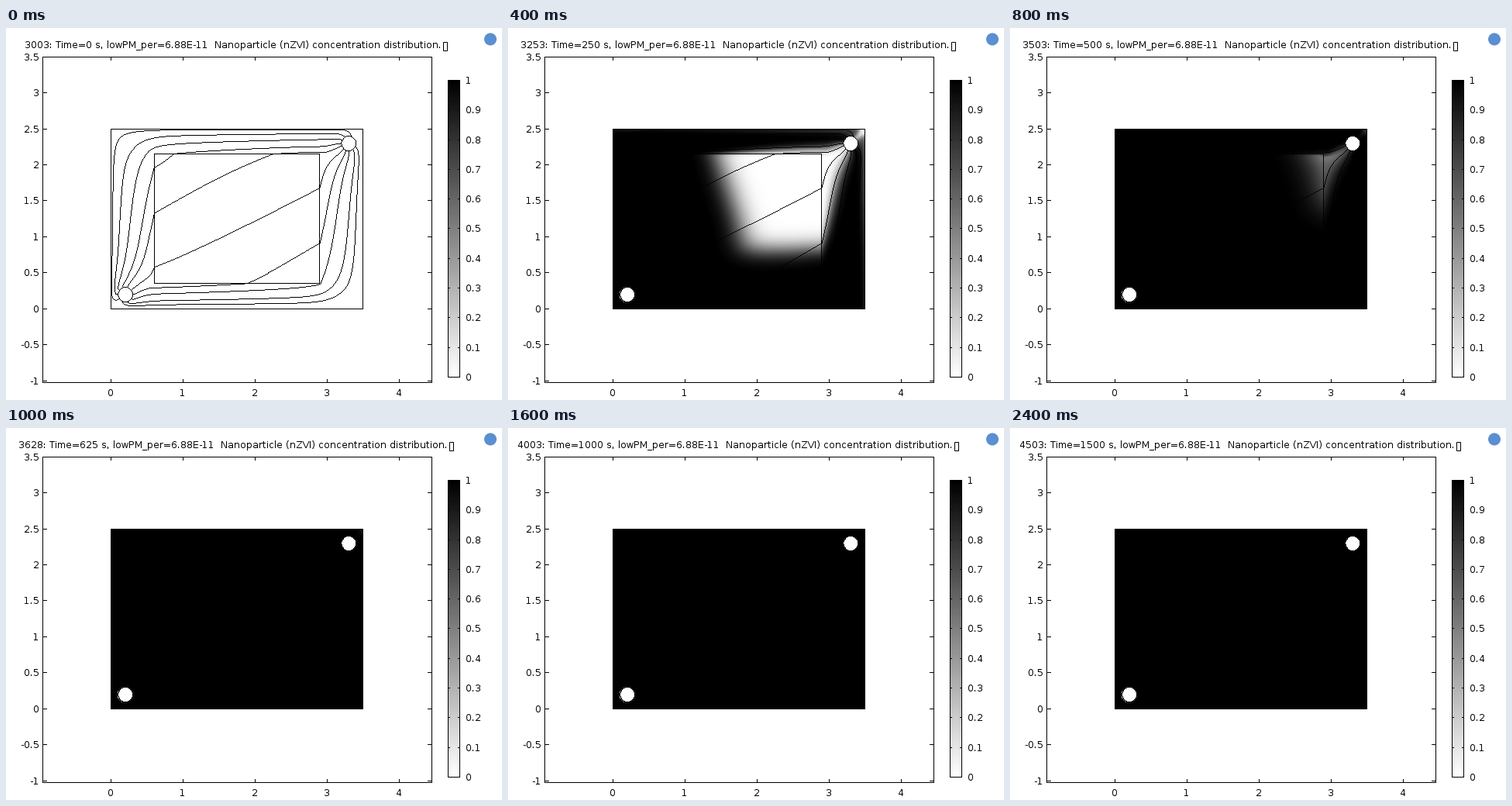
Animation, 640 px wide and 480 px high, one loop 2500 ms. Source, as a matplotlib script:

```python
import numpy as np
import matplotlib.pyplot as plt
from matplotlib.animation import FuncAnimation
from matplotlib.patches import Circle, Rectangle

W, H, DPI = 640, 480, 100
FRAMES, STEP = 25, 62.5
PX = 72 / DPI

# Flow model: box with a tight inner block, inlet bottom left, outlet top right
CELL, NX, NY = 0.025, 140, 100
BLOCK = (0.6, 0.35, 2.9, 2.15)
INLET, OUTLET, R = (0.2, 0.2), (3.3, 2.3), 0.1
BLOCK_PERM, RATE, DIFFUSION = 0.135, 0.032, 1.2e-5

X, Y = np.meshgrid((np.arange(NX) + 0.5) * CELL, (np.arange(NY) + 0.5) * CELL)
r_in = np.hypot(X - INLET[0], Y - INLET[1])
r_out = np.hypot(X - OUTLET[0], Y - OUTLET[1])


def conductance():
    """Harmonic means of permeability on cell faces, closed at the walls."""
    x0, y0, x1, y1 = BLOCK
    k = np.where((X > x0) & (X < x1) & (Y > y0) & (Y < y1), BLOCK_PERM, 1.0)
    k[r_in < R] = 1e-6
    tx, ty = np.zeros((NY, NX + 1)), np.zeros((NY + 1, NX))
    tx[:, 1:-1] = 2 * k[:, 1:] * k[:, :-1] / (k[:, 1:] + k[:, :-1])
    ty[1:-1] = 2 * k[1:] * k[:-1] / (k[1:] + k[:-1])
    return tx, ty


def pressure(tx, ty, source):
    """Solve the Darcy equation column by column (block Thomas)."""
    ground = 1e3 * (r_out < R)
    diag = tx[:, 1:] + tx[:, :-1] + ty[1:] + ty[:-1] + ground
    inv, rhs = [], []
    for i in range(NX):
        side = ty[1:-1, i]
        m = np.diag(diag[:, i]) - np.diag(side, 1) - np.diag(side, -1)
        b = source[:, i].copy()
        if i:
            t = tx[:, i]
            m -= t[:, None] * inv[-1] * t
            b += t * (inv[-1] @ rhs[-1])
        inv.append(np.linalg.inv(m))
        rhs.append(b)
    p, nxt = np.zeros((NY, NX)), np.zeros(NY)
    for i in reversed(range(NX)):
        nxt = p[:, i] = inv[i] @ (rhs[i] + tx[:, i + 1] * nxt)
    return p


def transport(fx, fy, tx, ty, source):
    """Upwind concentration field at every frame."""
    dx, dy = DIFFUSION * (tx > 1e-4), DIFFUSION * (ty > 1e-4)
    gain = np.array([
        (np.maximum(fx, 0) + dx)[:, :-1], (np.maximum(-fx, 0) + dx)[:, 1:],
        (np.maximum(fy, 0) + dy)[:-1], (np.maximum(-fy, 0) + dy)[1:],
        source]) / CELL ** 2
    total = gain.sum(axis=0)
    n = int(np.ceil(STEP * total.max()))
    left, right, down, up, feed = gain * (STEP / n)
    keep = 1 - total * STEP / n
    pad = np.zeros((NY + 2, NX + 2))
    c = pad[1:-1, 1:-1]
    shots = [c.copy()]
    for _ in range(FRAMES - 1):
        for _ in range(n):
            c[:] = (keep * c + left * pad[1:-1, :-2] + right * pad[1:-1, 2:]
                    + down * pad[:-2, 1:-1] + up * pad[2:, 1:-1] + feed)
        shots.append(c.copy())
    return shots


def streamlines(fx, fy, count=10, ds=0.003):
    """Follow the flow from evenly spaced points on the inlet."""
    a = 2 * np.pi * np.arange(count) / count
    ring = np.array([np.cos(a), np.sin(a)])
    centre = np.array(INLET)[:, None]
    p = centre + (R + CELL) * ring
    path = [centre + R * ring, p]
    for _ in range(2600):
        gx, gy = p / CELL
        i = np.clip(gx.astype(int), 0, NX - 1)
        j = np.clip(gy.astype(int), 0, NY - 1)
        v = np.array([fx[j, i] + (gx - i) * (fx[j, i + 1] - fx[j, i]),
                      fy[j, i] + (gy - j) * (fy[j + 1, i] - fy[j, i])])
        alive = np.hypot(p[0] - OUTLET[0], p[1] - OUTLET[1]) > R
        p = p + ds * alive * v / (np.hypot(*v) + 1e-30)
        path.append(p)
    return np.array(path).transpose(2, 1, 0)


tx, ty = conductance()
feed = ((r_in >= R) & (r_in < R + 1.5 * CELL)).astype(float)
feed *= RATE / feed.sum()
p = pressure(tx, ty, feed)
fx, fy = np.zeros_like(tx), np.zeros_like(ty)
fx[:, 1:-1] = tx[:, 1:-1] * (p[:, :-1] - p[:, 1:])
fy[1:-1] = ty[1:-1] * (p[:-1] - p[1:])
shots = transport(fx, fy, tx, ty, feed)

# Stage
plt.rcParams.update({
    "font.family": "DejaVu Sans",
    "font.size": 12 * PX,
    "text.hinting": "native",
    "text.hinting_factor": 1,
    "toolbar": "None",
})
fig = plt.figure(figsize=(W / DPI, H / DPI), dpi=DPI, facecolor="white")
ax = fig.add_axes([0, 0, 1, 1])
ax.axis("off")
ink = np.zeros((H, W, 4))


def px(x):
    return 135.4 + 92.95 * x


def py(y):
    return 362.3 - 92.9 * y


def line(xs, ys):
    """Crisp one-pixel line."""
    xs, ys = np.array(xs, float), np.array(ys, float)
    step = np.maximum(abs(np.diff(xs)), abs(np.diff(ys)))
    s = np.r_[0, np.cumsum(step)]
    t = np.linspace(0, s[-1], int(np.ceil(s[-1])) + 1)
    ink[np.interp(t, s, ys).astype(int), np.interp(t, s, xs).astype(int), 3] = 1


def box(x0, y0, x1, y1):
    line([x0, x1, x1, x0, x0], [y0, y0, y1, y1, y0])


def label(x, y, s, ha="left"):
    return ax.text(x, y, s, ha=ha, va="baseline", color="k", zorder=6)


def shade(data, extent, **kw):
    return ax.imshow(data, cmap="gray_r", vmin=0, vmax=1, extent=extent,
                     aspect="auto", zorder=1, **kw)


img = shade(shots[0], (135, 461, 363, 130), origin="lower",
            interpolation="bilinear")

# Axes frame, ticks and labels
box(47, 37, 549, 457)
for v in np.arange(-1, 4, 0.5):
    y = int(py(v))
    line([47, 52], [y, y])
    line([544, 549], [y, y])
    label(43, y + 5, f"{v:g}", "right")
for v in range(5):
    x = int(px(v))
    line([x, x], [37, 41])
    line([x, x], [453, 457])
    label(x, 475, str(v), "center")

# Colour bar
shade(np.linspace(1, 0, 384)[:, None], (570, 586, 451, 67))
box(570, 67, 585, 450)
for i in range(11):
    y = int(450.45 - 38.3 * i)
    line([570, 572], [y, y])
    line([583, 585], [y, y])
    label(593, y + 5, f"{i / 10:g}")

# Domain, block, wells and streamlines
box(px(0), py(2.5), px(3.5), py(0))
box(px(BLOCK[0]), py(BLOCK[3]), px(BLOCK[2]), py(BLOCK[1]))
for xs, ys in streamlines(fx, fy):
    line(px(xs), py(ys))
turn = np.linspace(0, 2 * np.pi, 200)
for x, y in (INLET, OUTLET):
    x, y = px(x) + 0.2, py(y) + 0.3
    rows, cols = np.mgrid[:H, :W] + 0.5
    ink[np.hypot(cols - x, rows - y) < 9.3, 3] = 0
    line(x + 9.4 * np.cos(turn), y + 9.4 * np.sin(turn))
    ax.add_patch(Circle((x, y), 9.4, fc="w", ec="none", zorder=3))
ax.imshow(ink, extent=(0, W, H, 0), interpolation="nearest", aspect="auto",
          zorder=4)

# Plain badge in the corner
ax.add_patch(Circle((625, 14.5), 8, fc="#5b8fd0", ec="none", zorder=4))

title = label(24, 26, "")
tofu = Rectangle((0, 17.5), 5, 11, fc="none", ec="k", lw=PX, zorder=6)
ax.add_patch(tofu)
ax.set_xlim(0, W)
ax.set_ylim(H, 0)


def update(i):
    sec = int(i * STEP + 0.5)
    shift = 4 * (len(str(sec)) - 1)
    title.set_text(f"{3003 + sec}: Time={sec} s, lowPM_per=6.88E-11  "
                   "Nanoparticle (nZVI) concentration distribution.")
    title.set_x(24 - shift)
    tofu.set_x(563.5 + shift)
    img.set_data(shots[i])
    return img, title, tofu


anim = FuncAnimation(fig, update, frames=FRAMES, interval=100,
                     repeat=True, repeat_delay=0, blit=False)
plt.show()
```
